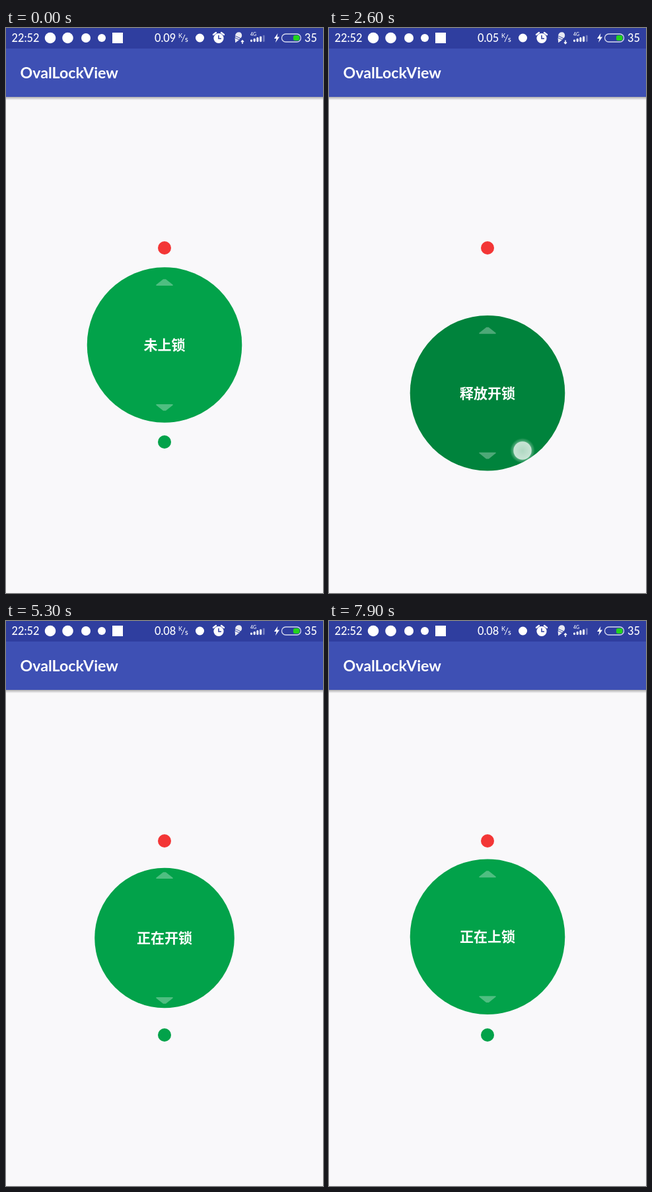
Animation, 480 px wide and 853 px high, one loop 8 s. Source, as an HTML page:

```html
<!DOCTYPE html>
<html lang="zh">
<head>
<meta charset="utf-8">
<title>OvalLockView</title>
<style>
html, body { margin: 0; width: 100%; height: 100%; overflow: hidden; background: #f9f8fa; }
svg { display: block; width: 480px; height: 853px; font-family: Lato, "Open Sans", sans-serif; }
#label { font: 700 21px "Noto Sans CJK SC", "Noto Sans CJK", sans-serif; }
</style>
</head>
<body>
<svg viewBox="0 0 480 853" xmlns="http://www.w3.org/2000/svg">
  <defs>
    <linearGradient id="shade" x2="0" y2="1">
      <stop offset="0" stop-color="#000" stop-opacity=".3"/>
      <stop offset="1" stop-color="#000" stop-opacity="0"/>
    </linearGradient>
    <radialGradient id="halo">
      <stop offset=".68" stop-color="#fff" stop-opacity=".38"/>
      <stop offset="1" stop-color="#fff" stop-opacity="0"/>
    </radialGradient>
    <radialGradient id="core">
      <stop offset="0" stop-color="#fff" stop-opacity=".5"/>
      <stop offset="1" stop-color="#fff" stop-opacity=".66"/>
    </radialGradient>
  </defs>
  <rect width="480" height="853" fill="#f9f8fa"/>
  <rect y="104" width="480" height="5" fill="url(#shade)"/>
  <rect width="480" height="104" fill="#3e50b4"/>
  <rect width="480" height="31" fill="#2f3e9f"/>
  <text x="21.5" y="76" font-size="23.2" font-weight="700" fill="#fff">OvalLockView</text>

  <g fill="#fff" font-size="16.3" font-weight="500">
    <text x="8.5" y="21">22:52</text>
    <circle cx="67" cy="15" r="8.3"/>
    <circle cx="93.5" cy="15" r="8.3"/>
    <circle cx="121" cy="15" r="7"/>
    <circle cx="145" cy="15" r="6"/>
    <rect x="161" y="7" width="16" height="16"/>
    <text id="rate" x="225" y="21"></text>
    <text x="261" y="15" font-size="9">K</text>
    <path d="M266 21L271 10" stroke="#fff"/>
    <text x="271" y="21" font-size="11">s</text>
    <circle cx="293.5" cy="15" r="6.5"/>
    <g id="alarm">
      <circle cx="322" cy="15.5" r="7.6"/>
      <path d="M314 10L318 7M330 10L326 7" stroke="#fff" stroke-width="2.4" stroke-linecap="round"/>
      <path d="M322 11V16H326" fill="none" stroke="#2f3e9f" stroke-width="1.5"/>
    </g>
    <g transform="rotate(25 351 14)" fill="#e8e9f3">
      <ellipse cx="351" cy="11.5" rx="5" ry="5.7"/>
      <path d="M347 16H355L351 23Z"/>
      <path d="M345.5 13.8H356.5M346.5 16.5H355.5" stroke="#2f3e9f" stroke-width=".8"/>
    </g>
    <path id="arrow" fill="none" stroke="#fff" stroke-width="1.5"/>
    <text x="370" y="12" font-size="7">4G</text>
    <g id="bars"></g>
    <path d="M411.5 8L406 16H409.5L408 22L414 13.5H410.5Z"/>
    <rect x="417.5" y="9" width="29" height="12" rx="6" fill="none" stroke="#d8dbef" stroke-width="1.3"/>
    <rect x="435" y="11" width="9.5" height="8" rx="2.5" fill="#22d41c"/>
    <text x="452" y="21">35</text>
  </g>

  <circle cx="240" cy="332" r="10" fill="#f33636"/>
  <circle cx="240" cy="625" r="10" fill="#02a24a"/>
  <g id="lock">
    <circle id="disc"/>
    <g fill="#fff" stroke="#fff" stroke-width="1.5" stroke-linejoin="round" opacity=".3">
      <path d="M228 -90.3L238.5 -98.6H241.5L252 -90.3Z"/>
      <path d="M228 90.3L238.5 98.6H241.5L252 90.3Z"/>
    </g>
    <text id="label" x="240" y="7.5" text-anchor="middle" fill="#fff"></text>
  </g>
  <g id="touch">
    <circle r="19" fill="url(#halo)"/>
    <circle r="13.7" fill="url(#core)"/>
  </g>
</svg>
<script>
const LOOP = 8000, STEP = 100, CY = 478.5, R = 117.3, MAX = 72.7, SLOP = 3;
const RETURN = 300, PULSE = 900, PULSE_START = 3010, IDLE = 5700;
const drags = [
  { down: 400, move: 650, stop: 2315, up: 2700, from: [302, 478], to: [293, 638], verb: '开锁' },
  { down: 6600, move: 6650, stop: 7350, up: 7630, from: [302, 500], to: [308, 346], verb: '上锁' }
];
const $ = id => document.getElementById(id);
const set = (id, attrs) => {
  for (const key in attrs) $(id).setAttribute(key, attrs[key]);
};
const clamp = (v, lo, hi) => Math.min(hi, Math.max(lo, v));
const mix = (a, b, p) => a + (b - a) * p;
const easeOutIn = p => (1 - Math.cos(Math.PI * p)) / 2;

for (let i = 0; i < 5; i++) {
  const h = 3.5 + i * 1.7;
  const bar = document.createElementNS('http://www.w3.org/2000/svg', 'rect');
  const attrs = { x: 370 + i * 4.7, y: 21 - h, width: 3, height: h, rx: 1.4, opacity: i < 4 ? 1 : .3 };
  for (const key in attrs) bar.setAttribute(key, attrs[key]);
  $('bars').append(bar);
}

function finger(d, t) {
  const p = clamp((t - d.move) / (d.stop - d.move), 0, 1);
  return d.from.map((v, i) => mix(v, d.to[i], p));
}

function pull(d, t) {
  const dy = finger(d, t)[1] - d.from[1];
  return Math.sign(dy) * clamp((Math.abs(dy) - SLOP) / 2, 0, MAX);
}

function lockState(t) {
  const s = { offset: 0, radius: R, label: '未上锁', fill: '#02a24a', touch: null };
  const d = drags.findLast(g => t >= g.down);
  if (!d || (d === drags[0] && t >= IDLE)) return s;
  if (t < d.up) {
    s.touch = finger(d, t);
    s.offset = pull(d, t);
    if (Math.abs(s.offset) >= MAX) {
      s.label = '释放' + d.verb;
      s.fill = '#00833c';
    }
  } else {
    s.label = '正在' + d.verb;
    s.offset = pull(d, d.up) * (1 - easeOutIn(clamp((t - d.up) / RETURN, 0, 1)));
    if (d === drags[0] && t >= PULSE_START) {
      s.radius = R * (1 - .1 * easeOutIn(2 * (t - PULSE_START) / PULSE));
    }
  }
  return s;
}

function arrowPath(t) {
  if (t < 400 || t >= 5500) return 'M358 24V19M356 21L358 18.8L360 21';
  if (t >= 2000 && t < 4000) return 'M358 18.5V23.5M356 21.5L358 23.7L360 21.5';
  return '';
}

function draw(t) {
  const s = lockState(t);
  set('lock', { transform: `translate(0 ${CY + s.offset})` });
  set('disc', { cx: 240, r: s.radius, fill: s.fill });
  $('label').textContent = s.label;
  $('rate').textContent = t < 2000 ? '0.09' : t < 5000 ? '0.05' : '0.08';
  set('arrow', { d: arrowPath(t) });
  set('touch', s.touch
    ? { visibility: 'visible', transform: `translate(${s.touch})` }
    : { visibility: 'hidden' });
}

const start = performance.now();
function tick() {
  const t = (performance.now() - start) % LOOP;
  draw(Math.floor(t / STEP) * STEP);
  requestAnimationFrame(tick);
}
tick();
</script>
</body>
</html>
```
